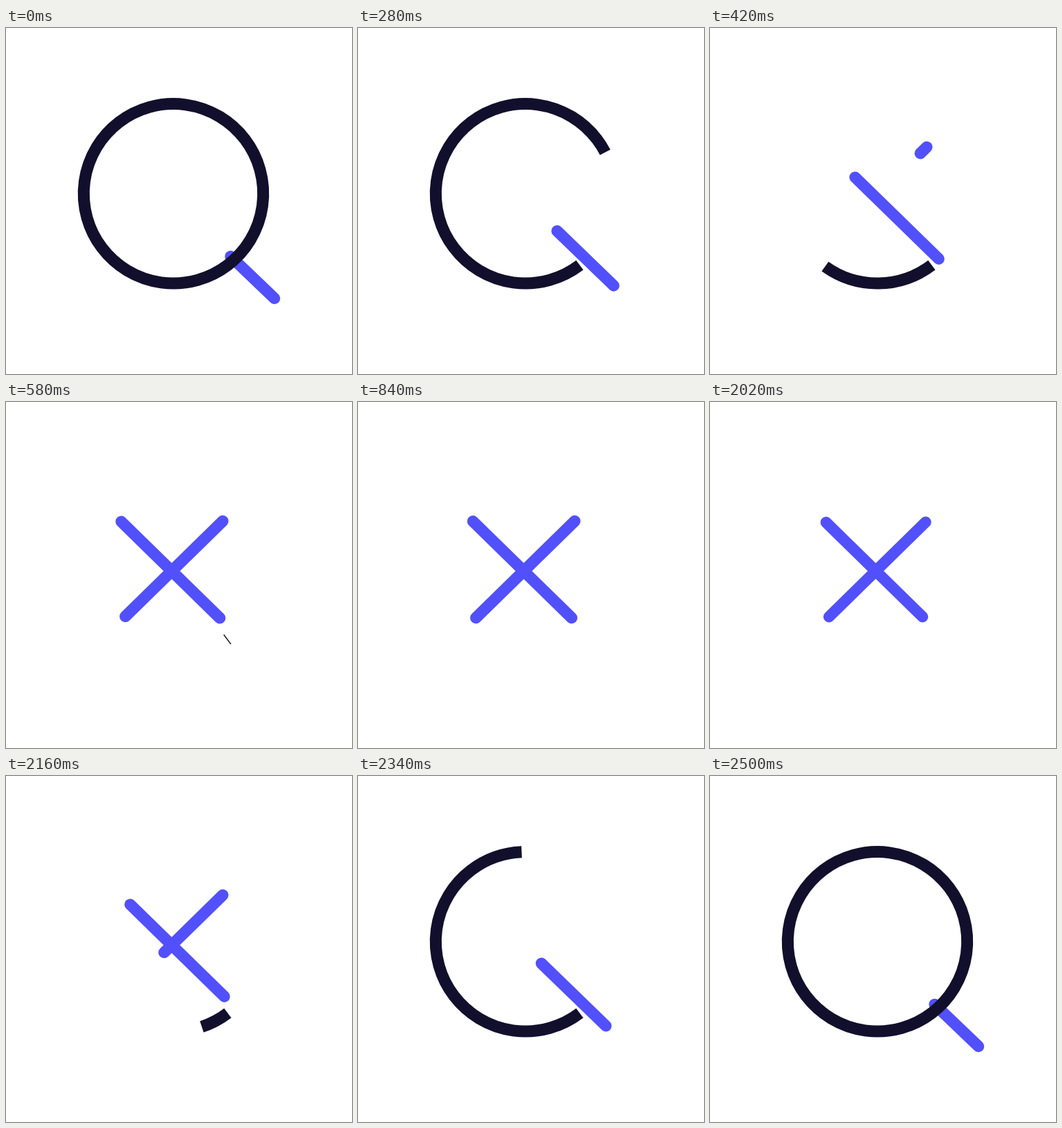
An HTML page with a canvas for the animation above (3580 ms loop, 500 by 500 pixels).

```html
<!DOCTYPE html>
<html lang="en">
<head>
<meta charset="utf-8">
<title>Search to close</title>
<style>
  html, body { margin: 0; width: 100%; height: 100%; overflow: hidden; background: #fff; }
  canvas { display: block; width: 100vmin; height: 100vmin; }
</style>
</head>
<body>
<canvas id="stage" width="500" height="500"></canvas>
<script>
const ctx = document.getElementById('stage').getContext('2d');
const LOOP = 3580, STEP = 20, MIRROR = 2660;
const BLUE = '#5250fb', NAVY = '#120f2d';
const CENTER = [239.5, 242];

// Cubic ease with flat ends; x1 and x2 are the horizontal handle positions.
const ease = (x1, x2) => x => {
  if (x <= 0) return 0;
  if (x >= 1) return 1;
  let lo = 0, hi = 1;
  for (let i = 0; i < 24; i++) {
    const s = (lo + hi) / 2, r = 1 - s;
    if (3 * r * r * s * x1 + 3 * r * s * s * x2 + s ** 3 < x) lo = s; else hi = s;
  }
  return lo * lo * (3 - 2 * lo);
};
const easeRing = ease(.39, .37);
const easeHandle = ease(.3, .54);
const easeStroke = ease(.43, .55);

const span = (t, from, to) => Math.min(1, Math.max(0, (t - from) / (to - from)));
const mix = (a, b, p) => a.map((v, i) => v + (b[i] - v) * p);

function line(a, b) {
  ctx.beginPath();
  ctx.moveTo(...a);
  ctx.lineTo(...b);
  ctx.strokeStyle = BLUE;
  ctx.lineWidth = 16.5;
  ctx.lineCap = 'round';
  ctx.stroke();
}

function ring(amount) {
  const start = 52.8 * Math.PI / 180;
  ctx.beginPath();
  ctx.arc(242, 239.3, 129.7, start, start + amount * 2 * Math.PI);
  ctx.strokeStyle = NAVY;
  ctx.lineWidth = 17;
  ctx.lineCap = 'butt';
  ctx.stroke();
}

function draw(time) {
  // The second half plays the first half backwards.
  const t = time < MIRROR / 2 ? time : MIRROR - time;
  const handle = easeHandle(span(t, 160, 600));
  const stroke = easeStroke(span(t, 380, 600));
  const ringLeft = 1 - easeRing(span(t, 160, 600));
  const scale = 1 - .09 * Math.sin(Math.PI * span(t, 600, 840)) ** 2;

  ctx.clearRect(0, 0, 500, 500);
  ctx.save();
  ctx.translate(...CENTER);
  ctx.scale(scale, scale);
  ctx.translate(-CENTER[0], -CENTER[1]);
  line(mix([324.5, 330], [166, 172.3], handle), mix([388, 390.7], [308.8, 312], handle));
  if (stroke > 0) line([313.3, 172], mix([313.3, 172], [170.3, 312], stroke));
  ctx.restore();
  if (ringLeft > 0) ring(ringLeft);
}

function tick() {
  const time = performance.now() % LOOP;
  draw(Math.floor(time / STEP) * STEP);
  requestAnimationFrame(tick);
}
tick();
</script>
</body>
</html>
```
